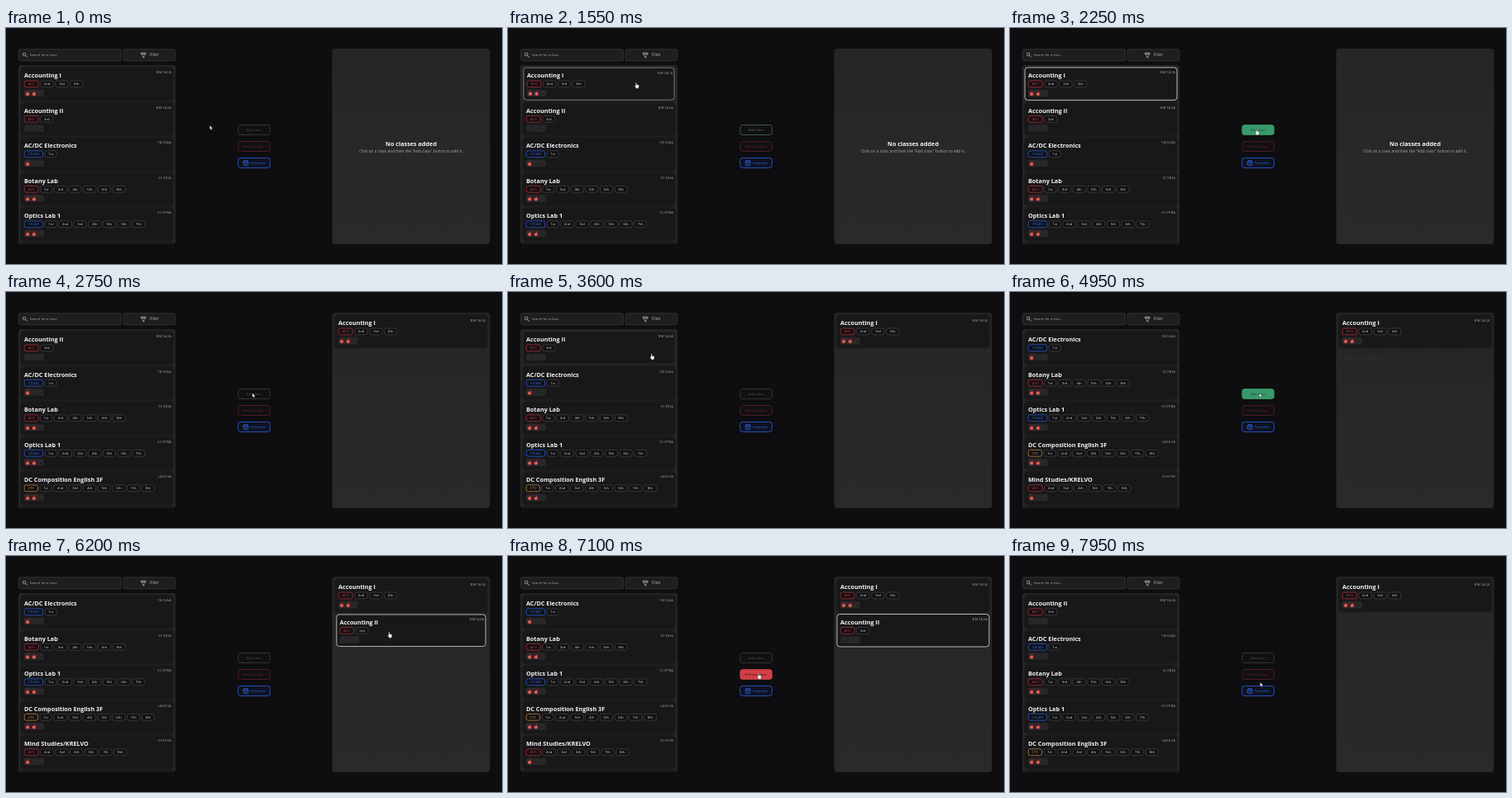
Recreate the animation shown at these times as an HTML page. Size 600 by 286 pixels, loop 8 s.

```html
<!DOCTYPE html>
<html lang="en">
<head>
<meta charset="utf-8">
<title>Class picker</title>
<style>
  html, body { margin: 0; width: 100%; height: 100%; overflow: hidden; background: #0e0d0f; }
  svg { display: block; width: 100%; height: 100%; }
  text { font-family: "Open Sans", "Noto Sans", sans-serif; }
  .mid { text-anchor: middle; }
  .title { font-size: 7.25px; font-weight: 700; fill: #f4f4f5; }
  .code { font-size: 4px; font-weight: 600; letter-spacing: .4px; fill: #858588; text-anchor: end; }
  .label { font-size: 4.2px; }
  .card { filter: drop-shadow(0 .8px 1.2px rgba(0, 0, 0, .55)); }
</style>
</head>
<body>
<svg id="stage" viewBox="0 0 600 286" xmlns="http://www.w3.org/2000/svg">
  <defs>
    <clipPath id="listClip"><rect x="15" y="45" width="190" height="216.5" rx="3"/></clipPath>
    <linearGradient id="panel" x1="0" y1="0" x2="0" y2="1">
      <stop offset="0" stop-color="#262628"/><stop offset="1" stop-color="#2a2a2c"/>
    </linearGradient>
  </defs>
</svg>
<script>
const LOOP = 8000, PITCH = 42.5, CARD_W = 184, CARD_H = 39.5;
const ADD_1 = 2300, ADD_2 = 4700, REMOVE_2 = 7250;
const stage = document.getElementById('stage');

function el(parent, tag, attrs = {}, text) {
  const node = document.createElementNS('http://www.w3.org/2000/svg', tag);
  set(node, attrs);
  if (text !== undefined) node.textContent = text;
  parent.appendChild(node);
  return node;
}
function set(node, attrs) {
  for (const key in attrs) node.setAttribute(key, attrs[key]);
}
function box(parent, x, y, width, height, rx, fill, stroke = 'none', line = .7) {
  return el(parent, 'rect', { x, y, width, height, rx, fill, stroke, 'stroke-width': line });
}

// Timing helpers
const clamp = v => Math.min(1, Math.max(0, v));
const ramp = (t, start, length = 150) => clamp((t - start) / length);
const span = (t, start, end, length = 150) => ramp(t, start, length) - ramp(t, end, length);
const smooth = p => p * p * (3 - 2 * p);

// Cubic Bézier easing with y handles at 0 and 1
const bezier = (x1, x2) => p => {
  let lo = 0, hi = 1, s = p;
  for (let i = 0; i < 20; i++) {
    s = (lo + hi) / 2;
    const x = 3 * x1 * s * (1 - s) ** 2 + 3 * x2 * s * s * (1 - s) + s ** 3;
    if (x < p) lo = s; else hi = s;
  }
  return s * s * (3 - 2 * s);
};
const easeIn = bezier(.42, 1), easeOut = bezier(0, .58), easeInOut = bezier(.42, .58);
const moved = (t, start) => t < start ? 0 : easeInOut(ramp(t, start, 250));
const entered = (t, start) => t < start ? 0 : clamp(2 * easeIn(ramp(t, start, 375)) - 1);
const left = (t, start) => t < start ? 0 : t >= start + 250 ? 1 : easeOut(ramp(t, start, 250));

function mix(a, b, p) {
  const part = (hex, i) => parseInt(hex.slice(1 + 2 * i, 3 + 2 * i), 16);
  return `rgb(${[0, 1, 2].map(i => Math.round(part(a, i) + (part(b, i) - part(a, i)) * p))})`;
}

// Cards
const TAGS = {
  AHS: [17, '#b8323a', '#c23138'],
  STEAM: [22.4, '#2a5ed0', '#2962e6'],
  CTC: [16.3, '#dc9748', '#d48b3b'],
};
const WIDTHS = { '1st': 14, '2nd': 15.6 };
const FLAME = 'M.1-2.7C.4-1.3 2-.5 2 .9A2 1.9 0 0 1-2 .9C-2 0-1.4-.4-1.2-1.2-.7-.9-.4-.5-.4-.2.2-.9.3-1.8.1-2.7Z';

const classes = [
  ['Accounting I', 'BM1ACA', 'AHS', '234', 2],
  ['Accounting II', 'BM1A2A', 'AHS', '3', 0],
  ['AC/DC Electronics', 'TA16AA', 'STEAM', '1', 1],
  ['Botany Lab', 'SC3BIA', 'AHS', '134568', 2],
  ['Optics Lab 1', 'SC3PBA', 'STEAM', '1234567', 2],
  ['DC Composition English 3F', 'LA5E3A', 'CTC', '12345678', 2],
  ['Mind Studies/KRELVO', 'SS3PSB', 'AHS', '234578', 1],
  ['', '', '', '', 0],
];

function makeCard(parent, [title, code, tag, periods, heat]) {
  const node = el(parent, 'g', { class: 'card' });
  const frame = box(node, 0, 0, CARD_W, CARD_H, 3.5, '#18181a', '#1d1d1f', .9);
  if (!title) return { node, frame };
  el(node, 'text', { x: 4, y: 12.2, class: 'title' }, title);
  el(node, 'text', { x: 182.4, y: 7.6, class: 'code' }, code);

  let x = 4.2;
  const pill = (label, width, ink, line) => {
    box(node, x, 16, width, 7.8, 2.2, '#121214', line);
    el(node, 'text', { x: x + width / 2, y: 21.4, class: 'mid label', fill: ink }, label);
    x += width + 2.6;
  };
  pill(tag, ...TAGS[tag]);
  for (const n of periods) {
    const label = n + (['st', 'nd', 'rd'][n - 1] || 'th');
    pill(label, WIDTHS[label] || 15.1, '#d2d2d5', '#454548');
  }

  box(node, 4, 26.8, 24, 8.6, 1.8, '#28282a');
  for (let i = 0; i < 3; i++) {
    const lit = i < heat;
    box(node, 4.4 + i * 7.8, 27.2, 7.4, 7.8, 1.3, lit ? '#38262a' : '#252527');
    el(node, 'path', {
      d: FLAME, transform: `translate(${8.1 + i * 7.8} 31.2)`,
      fill: lit ? '#ee625b' : '#202022', stroke: lit ? 'none' : '#3b3b3e', 'stroke-width': .6,
    });
  }
  return { node, frame };
}

function placeCard(card, x, y, { opacity = 1, scale = 1, hover = 0, selected = 0 } = {}) {
  const cx = CARD_W / 2, cy = CARD_H / 2;
  set(card.node, {
    transform: `translate(${x + cx} ${y + cy}) scale(${scale}) translate(${-cx} ${-cy})`,
    opacity, display: opacity > 0 ? 'inline' : 'none',
  });
  const line = selected > 0 ? mix('#48484b', '#cfcfd1', selected) : mix('#1d1d1f', '#48484b', hover);
  card.frame.setAttribute('stroke', line);
}

// Search and filter
box(stage, 15.3, 25.8, 124.4, 14, 2, '#1e1e20', '#3a3a3d');
el(stage, 'circle', { cx: 22.2, cy: 32, r: 1.8, fill: 'none', stroke: '#c4c4c7', 'stroke-width': .7 });
el(stage, 'path', { d: 'M23.5 33.3l2.2 2.3', stroke: '#c4c4c7', 'stroke-width': .8 });
el(stage, 'text', { x: 28.5, y: 34.3, fill: '#a4a4a7', 'font-size': 4.08 }, 'Search for a class');
box(stage, 142.3, 25.8, 62.4, 14, 2, '#1e1e20', '#3a3a3d');
el(stage, 'path', {
  d: 'M163.4 30.2h5.6v1.2l-2 2.2v2.5l-1.6-.9v-1.6l-2-2.2ZM163.4 31.4h5.6',
  fill: 'none', stroke: '#c4c4c7', 'stroke-width': .7,
});
el(stage, 'text', { x: 174, y: 34.4, fill: '#b5b5b8', 'font-size': 4.6 }, 'Filter');

// Panels
box(stage, 15, 45, 190, 216.5, 3, '#272729');
const list = el(stage, 'g', { 'clip-path': 'url(#listClip)' });
const listCards = classes.slice().reverse().map(c => makeCard(list, c)).reverse();

box(stage, 395, 25.5, 190, 236, 3, 'url(#panel)', '#303032', .6);
const empty = el(stage, 'g');
el(empty, 'text', { x: 490, y: 142.8, class: 'title mid', 'font-size': 7.1 }, 'No classes added');
el(empty, 'text', { x: 490, y: 150.6, class: 'mid', fill: '#a9a9ac', 'font-size': 4.78 },
  'Click on a class and then the "Add class" button to add it.');
const chosen = [1, 0].map(i => makeCard(stage, classes[i])).reverse();

// Buttons
function makeButton(y, label, x = 300) {
  const frame = box(stage, 280.8, y, 38.6, 12, 3, '#111012', '#000', .8);
  const text = el(stage, 'text', { x, y: y + 7.6, class: 'mid label' }, label);
  return { frame, text };
}
function paintButton({ frame, text }, [off, on, fill, offInk, onInk, fillInk], enabled, hover) {
  const line = hover > 0 ? mix(on, fill, hover) : mix(off, on, enabled);
  set(frame, { stroke: line, fill: mix('#111012', fill, hover) });
  text.setAttribute('fill', hover > 0 ? mix(onInk, fillInk, hover) : mix(offInk, onInk, enabled));
}
const GREEN = ['#39423c', '#559a72', '#389a6b', '#474c49', '#748a7d', '#1d4733'];
const RED = ['#5c2024', '#c2383f', '#cf3f46', '#6c2328', '#b8434a', '#4c1317'];
const addButton = makeButton(117.5, 'Add class');
const removeButton = makeButton(137.5, 'Remove class');
const schedule = makeButton(157.5, 'Schedule', 305);
set(schedule.frame, { stroke: '#2560e4', fill: '#0f1320' });
schedule.text.setAttribute('fill', '#2d67ea');
box(stage, 287.3, 161, 5.6, 5.4, .8, 'none', '#2d67ea', .8);
el(stage, 'path', {
  d: 'M287.3 162.8h5.6M288.8 160v1.6M291.4 160v1.6M289 164.6h2.2',
  stroke: '#2d67ea', 'stroke-width': .8,
});

// Pointer
const pointer = el(stage, 'g', { stroke: '#111', 'stroke-width': .35, fill: '#fff' });
const arrow = el(pointer, 'path', { d: 'M0 0V5.2L1.2 4.1 2 5.9 2.9 5.5 2.1 3.8H3.7Z' });
const hand = el(pointer, 'path', {
  d: 'M-.6.5Q0-.3.6.5V2.5L2.9 3Q3.6 3.2 3.5 4L3 6.3V7.2H-.3V6.4L-2 4.3Q-1.9 3.4-1 4L-.6 4.4Z',
});
const PATH = [
  [0, 246.5, 118], [50, 246.5, 118], [350, 243, 115], [550, 243, 115],
  [1150, 155, 66], [1600, 155, 66], [2100, 298, 122.5], [3250, 298, 122.5],
  [3700, 156, 68], [3900, 156, 68], [4400, 301.5, 122.5], [5450, 301.5, 122.5],
  [6000, 463.5, 92], [6350, 463.5, 92], [6950, 303, 142], [7750, 303, 142],
  [7950, 302.5, 153], [LOOP, 302.5, 153],
];
function pointerAt(t) {
  const i = PATH.findIndex(([time]) => time > t);
  const [t0, x0, y0] = PATH[i - 1], [t1, x1, y1] = PATH[i];
  const p = smooth((t - t0) / (t1 - t0));
  return [x0 + (x1 - x0) * p, y0 + (y1 - y0) * p];
}
const within = (t, ...ranges) => ranges.some(([a, b]) => t >= a && t < b);

const pressed = (t, start) => 1 - .02 * span(t, start, start + 220, 200);
const entryScale = shown => .98 + .02 * shown;

function draw(t) {
  const first = moved(t, ADD_1);
  const second = moved(t, ADD_2) - moved(t, REMOVE_2);
  const out1 = left(t, ADD_1), out2 = left(t, ADD_2), back2 = entered(t, REMOVE_2);

  listCards.forEach((card, i) => {
    const y = 47.9 + PITCH * (i - (i > 0 ? first : 0) - (i > 1 ? second : 0));
    const look = {};
    if (i === 0) Object.assign(look, {
      opacity: 1 - out1, scale: entryScale(1 - out1) * pressed(t, 1450),
      hover: span(t, 840, 1795), selected: ramp(t, 1450, 200),
    });
    if (i === 1) {
      const shown = t < REMOVE_2 ? 1 - out2 : back2;
      Object.assign(look, {
        opacity: shown, scale: entryScale(shown) * pressed(t, 3850),
        hover: span(t, 3530, 4090), selected: t < REMOVE_2 ? ramp(t, 3850, 200) : 0,
      });
    }
    placeCard(card, 18, y, look);
  });

  empty.setAttribute('opacity', 1 - out1);
  const in1 = entered(t, ADD_1);
  placeCard(chosen[0], 398, 28, { opacity: in1, scale: entryScale(in1) });
  const in2 = entered(t, ADD_2) * (1 - left(t, REMOVE_2));
  placeCard(chosen[1], 398, 28 + PITCH, {
    opacity: in2, scale: entryScale(in2) * pressed(t, 6000),
    hover: span(t, 5760, 6580), selected: ramp(t, 6000, 200),
  });

  paintButton(addButton, GREEN,
    span(t, 1450, 2550, 200) + span(t, 3850, 4950, 200),
    span(t, 1990, 2550) + span(t, 4280, 4950));
  paintButton(removeButton, RED, span(t, 6200, 7500, 200), span(t, 6836, 7500));

  const [x, y] = pointerAt(t);
  const isHand = within(t, [840, 1795], [1990, ADD_1], [3530, 4090], [4280, ADD_2], [5760, 6580], [6836, REMOVE_2]);
  pointer.setAttribute('transform', `translate(${x} ${y})`);
  arrow.setAttribute('display', isHand ? 'none' : 'inline');
  hand.setAttribute('display', isHand ? 'inline' : 'none');
}

const start = performance.now();
function tick() {
  draw((performance.now() - start) % LOOP);
  requestAnimationFrame(tick);
}
tick();
</script>
</body>
</html>
```
